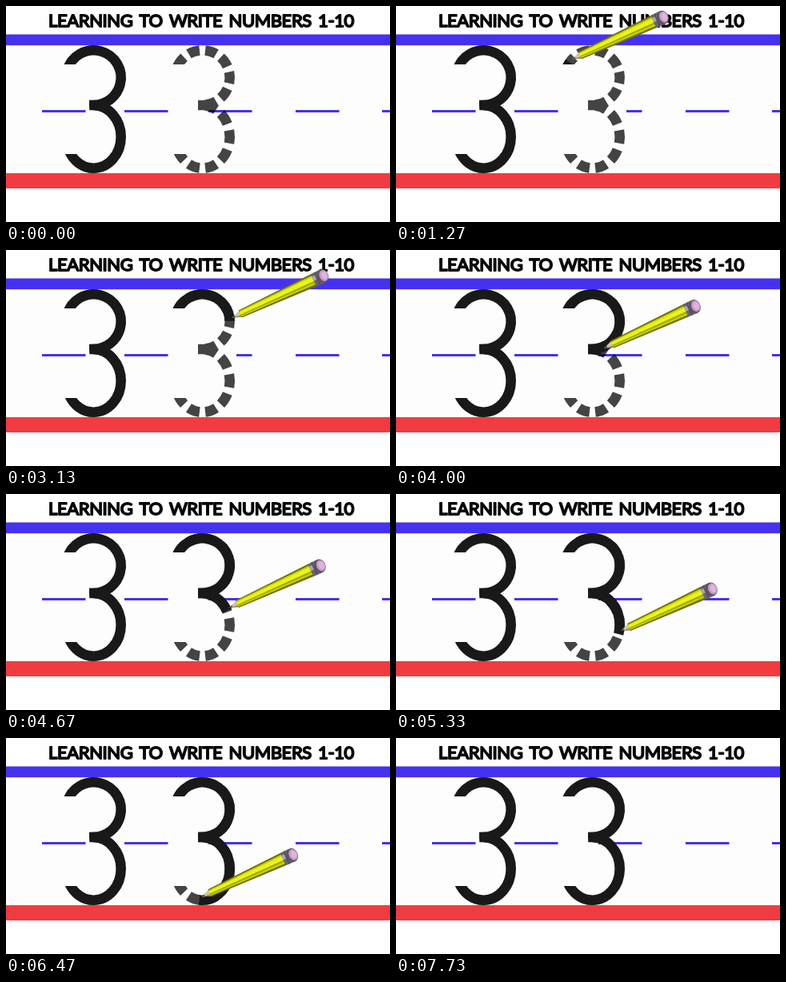
These frames come from a looping animation (480 by 270 pixels, 7790 ms). An HTML page with a canvas:

```html
<!DOCTYPE html>
<html lang="en">
<head>
<meta charset="utf-8">
<title>Learning to write numbers</title>
<style>
  html, body { margin: 0; width: 100%; height: 100%; overflow: hidden; background: #fefefe; }
  canvas { display: block; }
</style>
</head>
<body>
<canvas id="stage" width="480" height="270"></canvas>
<script>
const ctx = document.getElementById('stage').getContext('2d');
const LOOP = 7790, FPS = 15;
const INK = '#191919', BLUE = '#4532f0', RED = '#f03c40', PAPER = '#fefdfd';
const MODEL_X = 109.5, TRACE_X = 245.5;
const rad = deg => deg * Math.PI / 180;

// The digit is two lobes around x = 0, joined by a short bar.
const STROKE = 12.6;
const UPPER = { y: 89.5, rx: 34.2, ry: 34.2 };
const LOWER = { y: 163.5, rx: 34.2, ry: 39.2 };
const BAR_X = -5.5, BAR_Y = 124;

// Pen progress in degrees: upper lobe, out along the bar and back, lower lobe.
const START = 195, BOTTOM = 450, TURN = 460, BACK = 470, END = 715;
const SHIFT = BACK - 270;
const KEYS = [[800, 207], [1470, 217], [2200, 272], [3130, 358], [4000, 490], [5330, 577], [6470, 657], [7100, END]];
const PEN_ON = 800, PEN_OFF = 7270, PATCH_OFF = 3800;

function progress(t) {
  if (t < PEN_ON) return START;
  const i = KEYS.findIndex(key => t < key[0]);
  if (i < 0) return END;
  const [t0, a] = KEYS[Math.max(i - 1, 0)], [t1, b] = KEYS[i];
  return a + (b - a) * (t - t0) / (t1 - t0);
}

const onLobe = (lobe, deg) =>
  [lobe.rx * Math.cos(rad(deg)), lobe.y + lobe.ry * Math.sin(rad(deg))];

function penPoint(u) {
  if (u <= BOTTOM) return onLobe(UPPER, u);
  if (u >= BACK) return onLobe(LOWER, u - SHIFT);
  return [BAR_X * (1 - Math.abs(u - TURN) / 10), BAR_Y];
}

function arc(lobe, from, to) {
  const [x, y] = onLobe(lobe, from);
  ctx.moveTo(x, y);
  ctx.ellipse(0, lobe.y, lobe.rx, lobe.ry, 0, rad(from), rad(to));
}

// The clip cuts both open ends level.
function strokeDigit(x, color, trace) {
  ctx.save();
  ctx.translate(x, 0);
  ctx.beginPath();
  ctx.rect(-60, 40, 120, 33);
  ctx.rect(BAR_X, 40, 80, 180);
  ctx.rect(-60, 185, 120, 40);
  ctx.clip();
  ctx.lineWidth = STROKE;
  ctx.strokeStyle = color;
  ctx.beginPath();
  trace();
  ctx.stroke();
  ctx.restore();
}

function inkDigit(x, u) {
  strokeDigit(x, INK, () => {
    arc(UPPER, START, Math.min(u, BOTTOM));
    if (u > BOTTOM) ctx.lineTo(penPoint(Math.min(u, TURN))[0], BAR_Y);
    if (u > BACK) arc(LOWER, 270, u - SHIFT);
  });
}

function dashedDigit(x) {
  strokeDigit(x, 'rgba(0,0,0,.73)', () => {
    for (let deg = 216; deg <= 432; deg += 36) {
      arc(UPPER, deg - 12, deg + 12);
      arc(LOWER, deg + 60, deg + 84);
    }
    ctx.moveTo(BAR_X, BAR_Y);
    ctx.lineTo(10, BAR_Y);
  });
}

function box(color, x, y, w, h) {
  ctx.fillStyle = color;
  ctx.fillRect(x, y, w, h);
}

function shape(color, ...points) {
  ctx.fillStyle = color;
  ctx.beginPath();
  points.forEach(p => ctx.lineTo(...p));
  ctx.fill();
}

function oval(color, x, rx, ry) {
  ctx.fillStyle = color;
  ctx.beginPath();
  ctx.ellipse(x, 0, rx, ry, 0, 0, 7);
  ctx.fill();
}

// A lengthwise band of the tapering pencil; top and bottom run from -1 to 1.
function band(color, x0, x1, top, bottom) {
  const half = x => 4.6 + x * .034;
  shape(color, [x0, top * half(x0)], [x1, top * half(x1)], [x1, bottom * half(x1)], [x0, bottom * half(x0)]);
}

function pencil(x, y) {
  ctx.save();
  ctx.translate(x, y);
  ctx.rotate(rad(-24.7));
  shape('#d0c8a4', [0, 0], [13, -5], [13, 5]);
  shape('#96896a', [0, 0], [13, 2], [13, 5]);
  shape('#4a4a48', [0, 0], [4, -1.6], [4, 1.6]);
  band('#6c7004', 11, 114, -1, 1);
  band('#c6d008', 11, 114, -.75, .7);
  band('#eaf41c', 11, 114, -.5, .1);
  band('#9aa206', 11, 114, .2, .4);
  band('#67636c', 112, 123, -1, 1);
  band('#aaa6b0', 112, 123, -.6, .1);
  band('#55515a', 116, 118, -1, 1);
  oval('#5f5266', 124.5, 7.2, 8.8);
  oval('#c69ac6', 126, 5.4, 7.2);
  oval('#dcb4dc', 126.8, 3.6, 5);
  ctx.restore();
}

function title() {
  ctx.font = '400 22px Lato, sans-serif';
  ctx.letterSpacing = '-0.4px';
  ctx.wordSpacing = '3px';
  ctx.textAlign = 'center';
  ctx.lineJoin = 'round';
  ctx.lineWidth = 1.8;
  ctx.fillStyle = ctx.strokeStyle = '#080808';
  const text = 'LEARNING TO WRITE NUMBERS 1-10';
  ctx.fillText(text, 244, 25.6);
  ctx.strokeText(text, 244, 25.6);
}

function draw(t) {
  const u = progress(t);
  box('#fefefe', 0, 0, 480, 270);
  box(PAPER, 0, 49, 480, 160);
  title();
  box(BLUE, 0, 35.5, 480, 13.7);
  box(RED, 0, 209, 480, 19);
  for (const x of [45, 148, 253, 362, 470]) box(BLUE, x, 130, 54.5, 3);
  if (t >= PEN_ON && t < PATCH_OFF) box(PAPER, 250, 129, 38, 5);

  inkDigit(MODEL_X, END);
  if (u < END) dashedDigit(TRACE_X);
  inkDigit(TRACE_X, u);
  if (t >= PEN_ON && t < PEN_OFF) {
    const [x, y] = penPoint(u);
    pencil(TRACE_X + x + 3, y - 4);
  }
}

function tick() {
  const t = performance.now() % LOOP;
  draw(Math.floor((t + 5) * FPS / 1000) * 1000 / FPS);
  requestAnimationFrame(tick);
}
tick();
</script>
</body>
</html>
```
